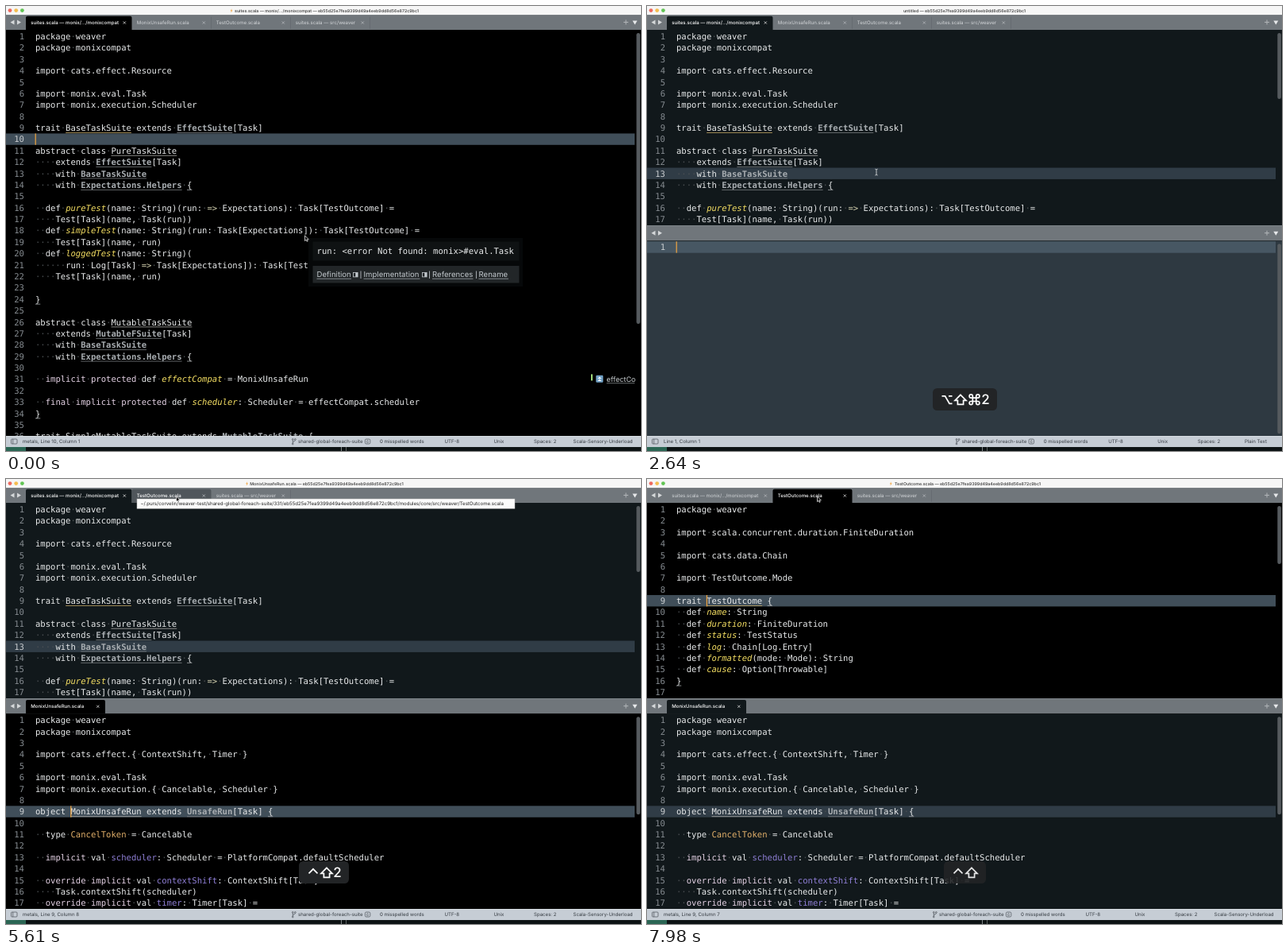
Write an HTML page that moves like this. It is 800 px wide and 560 px high and loops after 8000 ms.

```html
<!DOCTYPE html>
<html lang="en">
<head>
<meta charset="utf-8">
<title>Editor panes</title>
<style>
html, body { margin: 0; width: 100%; height: 100%; overflow: hidden; background: #000; }
#stage { display: block; width: 800px; height: 560px; }
text { white-space: pre; text-rendering: geometricPrecision; font-family: Inter, Roboto, sans-serif; }
.code { font: 10.58px "DejaVu Sans Mono", monospace; fill: #e9ebec; }
.num { fill: #858b90; text-anchor: end; }
.now { fill: #c9cdd0; }
.dot { fill: #4b5053; }
.fn { fill: #f5df63; font-style: italic; }
.val { fill: #8f7fd6; }
.type { fill: #e2b06a; }
.base { fill: #a9aeb2; font-weight: bold; }
.mod { fill: #e6d3e6; }
.op { fill: #d9d6b4; }
</style>
</head>
<body>
<svg id="stage" viewBox="0 0 800 560">
  <g id="scene"></g>
  <g id="keys"></g>
  <g id="mouse"></g>
</svg>
<script>
const LOOP = 8000, CW = 6.37, LH = 14.38, LEFT = 36.9;
const HASH = 'eb55d25e7fea9399d49a4eeb9dd8d56e872c9bc1';
const $ = id => document.getElementById(id);

const FILES = {
  suites: `package weaver
package monixcompat

import cats.effect.Resource

import monix.eval.Task
import monix.execution.Scheduler

trait BaseTaskSuite extends EffectSuite[Task]

abstract class PureTaskSuite
    extends EffectSuite[Task]
    with BaseTaskSuite
    with Expectations.Helpers {

  def pureTest(name: String)(run: => Expectations): Task[TestOutcome] =
    Test[Task](name, Task(run))
  def simpleTest(name: String)(run: Task[Expectations]): Task[TestOutcome] =
    Test[Task](name, run)
  def loggedTest(name: String)(
      run: Log[Task] => Task[Expectations]): Task[TestOutcome] =
    Test[Task](name, run)

}

abstract class MutableTaskSuite
    extends MutableFSuite[Task]
    with BaseTaskSuite
    with Expectations.Helpers {

  implicit protected def effectCompat = MonixUnsafeRun

  final implicit protected def scheduler: Scheduler = effectCompat.scheduler
}

trait SimpleMutableTaskSuite extends MutableTaskSuite {`,
  unsafe: `package weaver
package monixcompat

import cats.effect.{ ContextShift, Timer }

import monix.eval.Task
import monix.execution.{ Cancelable, Scheduler }

object MonixUnsafeRun extends UnsafeRun[Task] {

  type CancelToken = Cancelable

  implicit val scheduler: Scheduler = PlatformCompat.defaultScheduler

  override implicit val contextShift: ContextShift[Task] =
    Task.contextShift(scheduler)
  override implicit val timer: Timer[Task] =`,
  outcome: `package weaver

import scala.concurrent.duration.FiniteDuration

import cats.data.Chain

import TestOutcome.Mode

trait TestOutcome {
  def name: String
  def duration: FiniteDuration
  def status: TestStatus
  def log: Chain[Log.Entry]
  def formatted(mode: Mode): String
  def cause: Option[Throwable]
}
`,
  blank: ''
};

const esc = s => s.replace(/&/g, '&amp;').replace(/</g, '&lt;').replace(/>/g, '&gt;');
const rect = (x, y, w, h, fill, more = '') =>
  `<rect x="${x}" y="${y}" width="${w}" height="${h}" fill="${fill}" ${more}/>`;
const path = (d, fill, more = '') => `<path d="${d}" fill="${fill}" ${more}/>`;
const label = (x, y, s, size, fill, more = '') =>
  `<text x="${x}" y="${y}" font-size="${size}" fill="${fill}" ${more}>${esc(s)}</text>`;
const span = (cls, s) => `<tspan class="${cls}">${esc(s)}</tspan>`;

const AFTER = { def: 'fn', val: 'val', type: 'type', extends: 'base', with: 'base' };

function codeLine(src, y) {
  let out = '', lines = '', prev = '', col = 0;
  const under = (n, c) => lines += rect(LEFT + col * CW, y + 2, n * CW, 0.8, c);
  for (const tok of src.match(/ +|[\w.]+|=>|./g) || []) {
    if (tok[0] === ' ') out += span('dot', '·'.repeat(tok.length));
    else {
      let cls = AFTER[prev] || '';
      if (/^(implicit|override|protected|final)$/.test(tok)) cls = 'mod';
      if (tok === '=>') cls = 'op';
      if (cls === 'base') under(tok.length, '#777b7e');
      if (/^(class|object)$/.test(prev)) under(tok.length, '#a9a9a6');
      if (prev === 'trait') under(tok.length, '#bfa361');
      if (/^[{}]$/.test(tok) && !src.startsWith('import')) under(1, '#a0a4a6');
      out += cls ? span(cls, tok) : esc(tok);
      prev = tok;
    }
    col += tok.length;
  }
  return `<text class="code" x="${LEFT}" y="${y}">${out}</text>${lines}`;
}

function tabBar(y, tabs, active, hover, bg) {
  let s = rect(0, y, 800, 19.3, '#70767b') + rect(0, y, 800, 0.8, '#82888d');
  const mid = y + 9.7;
  s += path(`M10.5 ${mid - 3}v6l-5-3zM14 ${mid - 3}v6l5-3z`, '#d5d8da');
  let x = 25;
  tabs.forEach((name, i) => {
    const w = i === 0 && name.includes('compat') ? 133.5 : 100;
    const on = i === active, hot = i === hover;
    if (on || hot)
      s += path(`M${x} ${y + 19.3}V${y + 4}q0-2 2-2H${x + w - 2}q2 0 2 2V${y + 19.3}z`, on ? bg : '#50565b');
    else s += rect(x + w - 0.4, y + 3, 0.7, 15, '#62686d');
    s += label(x + 6.2, mid + 2.2, name, 6.1, on || hot ? '#fff' : '#d3d6d9', on || hot ? 'font-weight="500"' : '');
    const c = x + w - 9.2;
    s += path(`M${c - 1.6} ${mid - 1}l3.2 3.2m0-3.2l-3.2 3.2`, 'none', `stroke="${on ? '#ddd' : '#b4b8bb'}" stroke-width=".8"`);
    x += w;
  });
  return s + path(`M778 ${mid}h6m-3-3v6`, 'none', 'stroke="#b9bdc0" stroke-width=".9"') +
    path(`M789.3 ${mid - 2}h6l-3 5z`, '#e6e8ea');
}

function pane(p, y, h) {
  const bg = p.bg || (p.focus ? '#000' : '#11181b');
  const rowFill = p.row || (p.focus ? '#404e59' : '#303c46');
  let s = tabBar(y - 19.3, p.tabs, p.active, p.hover, bg);
  s += `<svg x="0" y="${y}" width="800" height="${h}">` + rect(0, 0, 800, h, bg);
  const rowY = 1 + (p.line - 1) * LH;
  s += rect(0, rowY, 792, LH, rowFill);
  FILES[p.file].split('\n').forEach((src, i) => {
    const base = 12 + i * LH;
    if (base - 10 > h) return;
    s += `<text class="code num ${i + 1 === p.line ? 'now' : ''}" x="23" y="${base}">${i + 1}</text>` + codeLine(src, base);
  });
  if (p.focus) s += rect(LEFT + (p.col - 1) * CW - 0.3, rowY, 1.2, LH, '#f0a540');
  if (p.file === 'suites' && h > 400) s += hint(12 + 30 * LH);
  s += rect(794.3, 4, 4.6, p.thumb, '#565b5f', 'rx="2.3"');
  return s + '</svg>';
}

function hint(y) {
  return rect(737, y - 10, 2, 8, '#9fd97a') +
    rect(743.3, y - 8.6, 9, 9, '#6f9fc4', 'rx="1.2"') +
    path(`M745.4 ${y - 4.4}l2.4-2.6 2.4 2.6zM745.4 ${y - 1.3}l2.4-2.6 2.4 2.6z`, '#fff') +
    label(756.6, y - 0.5, 'effectCo', 9, '#c5cacd') + rect(756.6, y + 1, 35.4, 0.7, '#8d9396');
}

function popup() {
  let s = rect(381, 292, 270, 61, '#060809') +
    rect(386.5, 296.5, 260, 24, '#0f1213') + rect(386.5, 327, 260, 21.5, '#222628') +
    `<text class="code" x="391.6" y="311.8">${esc('run: <error Not found: monix>#eval.Task')}</text>`;
  for (const [x, w, name] of [[391.5, 43.5, 'Definition'], [450.5, 71, 'Implementation'], [537, 51.5, 'References'], [595.5, 37.5, 'Rename']])
    s += label(x, 341.4, name, 9.6, '#c3c9ce') + rect(x, 342.8, w, 0.8, '#9ba1a6');
  for (const x of [437.5, 524.5])
    s += rect(x, 335.5, 5.6, 5.4, 'none', 'stroke="#c3c9ce" stroke-width=".8"') + rect(x + 2.8, 335.5, 2.8, 5.4, '#c3c9ce');
  for (const x of [446.6, 533, 592]) s += rect(x, 333.5, 0.8, 9.5, '#c3c9ce');
  return s;
}

function tooltip() {
  return rect(165, 25, 476, 12.2, '#fbfbfb', 'stroke="#b5b5b5" stroke-width=".5"') +
    label(169.5, 33.2, `~/.purs/corvelin/weaver-test/shared-global-foreach-suite/331/${HASH}/modules/core/src/weaver/TestOutcome.scala`, 6.1, '#222');
}

function titleBar(name) {
  let s = rect(0, 0, 800, 11, '#f6f6f6');
  ['#ee6a5f', '#f5bd4f', '#61c454'].forEach((c, i) => s += `<circle cx="${5 + i * 7.7}" cy="5.6" r="2.4" fill="${c}"/>`);
  const saved = name !== 'untitled', mid = saved ? 404 : 400;
  const left = mid - (143 + name.length * 2.44) / 2;
  if (saved) s += path(`M${left - 4} 3.2l-2 3h1.4l-.8 2.4 2.4-3.2h-1.5z`, '#f0a23c');
  return s + label(mid, 7.6, `${name} — ${HASH}`, 5.25, '#4a4a4a', 'text-anchor="middle" font-weight="600"');
}

function statusBar(p) {
  const plain = p.file === 'blank', dx = plain ? 28.7 : 0;
  const put = (x, s) => label(x, 550.1, s, 6.1, '#343a40');
  const line = 'fill="none" stroke="#4a5056" stroke-width=".7"';
  return rect(0, 541, 800, 14, '#c6cdd5') + rect(0, 541, 800, 0.7, '#dde2e7') +
    rect(0, 555, 800, 5, '#0d1314') + rect(0, 555, 25, 5, '#2b6654') + rect(422, 555, 1, 5, '#7d8486') + rect(428, 555, 1, 5, '#59605f') +
    `<rect x="6.5" y="545" width="7.5" height="6" rx="1" ${line}/><path d="M8.7 545v6" ${line}/>` +
    put(21, `${plain ? '' : 'metals, '}Line ${p.line}, Column ${p.col}`) +
    `<g transform="translate(${dx} 0)"><path d="M361.3 546v4.5M364.4 546q0 2.2-3.1 2.6" ${line}/>` +
    `<circle cx="361.3" cy="545.4" r=".9" ${line}/><circle cx="364.4" cy="545.4" r=".9" ${line}/><circle cx="361.3" cy="551" r=".9" ${line}/>` +
    `<rect x="452.4" y="545" width="6.4" height="6" rx="1.5" ${line}/>` + label(454, 550, '6', 5, '#4a5056') +
    put(368, 'shared-global-foreach-suite') + put(471, '0 misspelled words') +
    put(552.5, 'UTF-8') + put(614.5, 'Unix') + put(665, 'Spaces: 2') + '</g>' +
    put(plain ? 753 : 714.5, plain ? 'Plain Text' : 'Scala-Sensory-Underload');
}

const S = 'suites.scala — monix/.../monixcompat', U = 'MonixUnsafeRun.scala', O = 'TestOutcome.scala', W = 'suites.scala — src/weaver';
const four = [S, U, O, W], three = [S, O, W];
const suites = { file: 'suites', tabs: four, active: 0, line: 13, col: 23, thumb: 83 };
const unsafe = { file: 'unsafe', tabs: [U], active: 0, line: 9, col: 8, thumb: 123 };
const blank = { file: 'blank', tabs: [], line: 1, col: 1, thumb: 239, bg: '#3a464d', row: '#45535e' };
const moved = { ...suites, tabs: three, hover: 1 };
const lower = { ...unsafe, focus: true };

const SCENES = [
  { at: 0, title: S, top: { ...suites, focus: true, line: 10, col: 1, thumb: 366 }, extra: popup },
  { at: 650, title: S, top: { ...suites, focus: true, line: 10, col: 1, thumb: 366 } },
  { at: 1200, title: S, top: { ...suites, focus: true, thumb: 366 } },
  { at: 2250, title: 'untitled', top: suites, low: { ...blank, focus: true, bg: '#2e3941', row: '#475763' } },
  { at: 4350, title: U, top: { ...unsafe, tabs: four, active: 1, focus: true }, low: blank },
  { at: 5100, title: U, top: moved, low: lower },
  { at: 5500, title: U, top: moved, low: lower, extra: tooltip },
  { at: 7250, title: O, top: { file: 'outcome', tabs: three, active: 1, line: 9, col: 7, thumb: 73, focus: true }, low: unsafe }
];

function drawScene(s) {
  const cur = s.low && s.low.focus ? s.low : s.top;
  return pane(s.top, 30, s.low ? 246 : 511) + (s.low ? pane(s.low, 295.3, 245.7) : '') +
    titleBar(s.title) + statusBar(cur) + (s.extra ? s.extra() : '');
}

// Key caps: advance width and outline around the centre.
const CAPS = {
  alt: [17, 'M-6.5-4.5h4L3 5h3.5M2-4.5h4.5'],
  shift: [17, 'M0-6L7 1H3.6v5h-7.2V1H-7z'],
  cmd: [18, 'M-2.2-4.3V4.3a2.1 2.1 0 1 1-2.1-2.1H4.3a2.1 2.1 0 1 1-2.1 2.1V-4.3a2.1 2.1 0 1 1 2.1 2.1H-4.3a2.1 2.1 0 1 1 2.1-2.1z'],
  ctrl: [17, 'M-5.5 1L0-4.5 5.5 1'],
  2: [10, '']
};
const PRESSES = [
  [1850, 2150, 'alt shift cmd'], [2150, 3150, 'alt shift cmd 2', 1],
  [4720, 5050, 'ctrl shift'], [5050, 6150, 'ctrl shift 2', 1],
  [7910, 9000, 'ctrl shift']
];

function drawKeys(t) {
  const hit = PRESSES.find(([a, b]) => t >= a && t < b);
  if (!hit) return '';
  const [a, b, names, held] = hit, caps = names.split(' ');
  const alpha = held ? Math.min(1, (b - t) / 200) : Math.min(1, (t - a) / 80);
  const w = caps.reduce((n, c) => n + CAPS[c][0], 19);
  let x = 400.5 - w / 2, s = rect(x, 481, w, 28, '#222426', 'rx="5.5"');
  x += 9.5;
  for (const c of caps) {
    const [adv, d] = CAPS[c];
    s += d ? path(d, 'none', `transform="translate(${x + adv / 2} 495.3)" stroke="#fff" stroke-width="1.7"`)
      : label(x + adv / 2, 501.4, c, 17, '#fff', 'text-anchor="middle" font-weight="500"');
    x += adv;
  }
  return `<g opacity="${alpha}">${s}</g>`;
}

const TRACK = [[0, 377, 292], [500, 377, 292], [1100, 289, 209], [3350, 289, 209], [3780, 221, 49], [4100, 215, 25], [LOOP, 215, 25]];

function drawMouse(t) {
  const i = TRACK.findIndex(k => k[0] > t), [ta, xa, ya] = TRACK[i - 1], [tb, xb, yb] = TRACK[i];
  const u = (t - ta) / (tb - ta), e = u * u * (3 - 2 * u);
  const x = xa + (xb - xa) * e, y = ya + (yb - ya) * e;
  const beam = t > 500 && y > 32;
  return `<g transform="translate(${x} ${y})">` + (beam
    ? path('M-1.6-3.8q1.6 0 1.6 1.2q0-1.2 1.6-1.2M0-2.6V2.8M-1.6 4q1.6 0 1.6-1.2q0 1.2 1.6 1.2', 'none', 'stroke="#d5d8da" stroke-width=".9"')
    : path('M-.5-3.2v6.8l1.6-1.4 1 2.2 1.1-.5-1-2.1h2.1z', '#111', 'stroke="#fff" stroke-width=".7"')) + '</g>';
}

let shown = null;
function frame() {
  const t = performance.now() % LOOP;
  const scene = SCENES.filter(s => s.at <= t).pop();
  if (scene !== shown) $('scene').innerHTML = drawScene(shown = scene);
  $('keys').innerHTML = drawKeys(t);
  $('mouse').innerHTML = drawMouse(t);
  requestAnimationFrame(frame);
}
frame();
</script>
</body>
</html>
```
